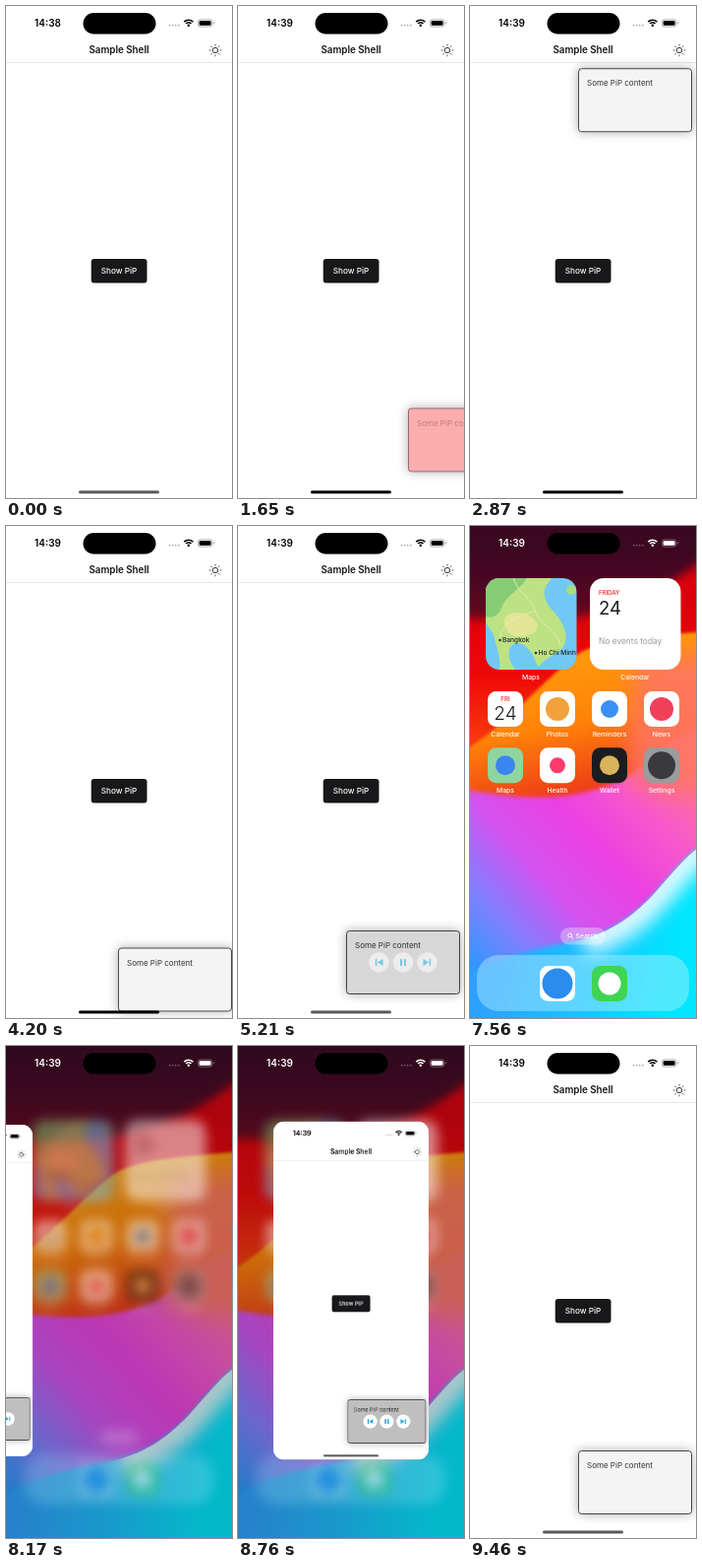
Animation of 230x500 px, one loop 9.66 s. Source, as an HTML page with a canvas:

```html
<!DOCTYPE html>
<html lang="en">
<head>
<meta charset="utf-8">
<title>Picture in picture demo</title>
<style>
html, body { margin: 0; width: 100%; height: 100%; overflow: hidden; background: #fff; }
canvas { display: block; width: 230px; height: 500px; }
</style>
</head>
<body>
<canvas id="stage"></canvas>
<script>
const W = 230, H = 500, LOOP = 9660;
const K = window.devicePixelRatio || 1;

function layer(canvas = document.createElement('canvas')) {
  canvas.width = W * K;
  canvas.height = H * K;
  const c = canvas.getContext('2d');
  c.scale(K, K);
  c.imageSmoothingQuality = 'high';
  return c;
}

const stage = layer(document.getElementById('stage'));
const app = layer(), wall = layer(), icons = layer();

// Eased value at time t from [time, value] keys.
function track(t, ...keys) {
  if (t <= keys[0][0]) return keys[0][1];
  for (let i = 1; i < keys.length; i++) {
    const [t0, a] = keys[i - 1], [t1, b] = keys[i];
    if (t < t1) {
      const u = (t - t0) / (t1 - t0);
      return a + (b - a) * u * u * (3 - 2 * u);
    }
  }
  return keys[keys.length - 1][1];
}

function box(c, x, y, w, h, r, fill) {
  c.beginPath();
  c.roundRect(x, y, w, h, r);
  if (fill) { c.fillStyle = fill; c.fill(); }
}

function disc(c, x, y, r, fill) {
  c.beginPath();
  c.arc(x, y, r, 0, 7);
  c.fillStyle = fill;
  c.fill();
}

function text(c, str, x, y, size, weight, fill, align = 'left') {
  c.font = `${weight} ${size}px Inter, sans-serif`;
  c.textAlign = align;
  c.fillStyle = fill;
  c.fillText(str, x, y);
}

function ramp(c, x0, y0, x1, y1, ...colors) {
  const g = c.createLinearGradient(x0, y0, x1, y1);
  colors.forEach((col, i) => g.addColorStop(i / (colors.length - 1), col));
  return g;
}

function shape(c, path, fill, blur = 0) {
  if (blur) c.filter = `blur(${blur * K}px)`;
  c.fillStyle = fill;
  c.fill(new Path2D(path));
  c.filter = 'none';
}

function statusBar(c, clock, color) {
  text(c, clock, 42.5, 21.2, 10, 600, color, 'center');
  c.save();
  c.globalAlpha *= 0.35;
  for (let i = 0; i < 4; i++) disc(c, 166.5 + 3.1 * i, 19.6, 0.85, color);
  c.restore();
  c.strokeStyle = color;
  c.lineWidth = 1.6;
  for (const r of [3.6, 6.2]) {
    c.beginPath();
    c.arc(185.8, 20.4, r, -Math.PI * 0.76, -Math.PI * 0.24);
    c.stroke();
  }
  disc(c, 185.8, 19.8, 1.2, color);
  c.save();
  c.globalAlpha *= 0.4;
  c.lineWidth = 0.8;
  box(c, 195.4, 13.8, 14.4, 7.2, 2.3);
  c.stroke();
  box(c, 210.7, 16.2, 1, 2.4, 0.5, color);
  c.restore();
  box(c, 196.6, 15, 12, 4.8, 1.4, color);
}

function paintWall(c) {
  c.fillStyle = ramp(c, 0, 460, 230, 250, '#1f9cff', '#7f80ff', '#d452f0', '#ec40e2', '#f858cc', '#ff70a0');
  c.fillRect(0, 0, W, H);

  // Cyan wave with a pale rim
  const crest = 'M240 322C200 345 185 400 115 420';
  const wave = crest + 'C70 428 30 438 -10 458V520H240Z';
  shape(c, wave, ramp(c, 0, 440, 200, 480, '#2f9cff', '#1cbcff', '#00e6ff'), 2);
  c.save();
  c.clip(new Path2D(wave));
  c.filter = `blur(${9 * K}px)`;
  c.strokeStyle = 'rgba(235,252,255,.9)';
  c.lineWidth = 36;
  c.stroke(new Path2D(crest));
  c.restore();

  // Orange, melting into salmon on the right
  shape(c, 'M-10 267C50 278 100 280 145 262C165 254 180 240 195 225L240 200V-10H-10Z',
    ramp(c, 70, 130, 100, 275, '#ff9c0c', '#ff8408', '#ee3a18'), 2);
  shape(c, 'M170 130H270V262C225 282 190 274 158 256Z', 'rgba(255,118,98,.9)', 13);

  shape(c, 'M-20 236C30 212 70 160 110 130C140 112 200 112 250 106V-20H-20Z',
    ramp(c, 0, 80, 0, 220, '#dc000c', '#ee0808', '#f83a0c'), 1.5);
  shape(c, 'M-30 90C40 100 90 98 130 88C170 78 205 62 260 16V-30H-30Z',
    ramp(c, 0, 0, 0, 95, '#36081f', '#460622', '#68081e'), 5);
}

function mapWidget(c) {
  c.save();
  box(c, 16, 53, 92.5, 93, 14, '#72c8f5');
  c.clip();
  shape(c, 'M16 53H84C72 64 74 74 84 86C96 98 102 114 94 124C86 132 76 134 70 143C64 136 66 130 58 124C52 116 42 118 40 126C38 136 44 142 46 146H30C32 132 26 122 24 110L16 98Z', '#bce283');
  shape(c, 'M16 53H58C50 66 36 70 32 84C28 92 22 94 16 92Z', '#86cc74');
  shape(c, 'M36 92C46 84 62 88 68 98C72 108 58 114 46 112C38 110 32 100 36 92Z', '#e2e596');
  disc(c, 103, 65, 5, '#a8dc80');
  c.strokeStyle = '#f0e6a8';
  c.lineWidth = 1;
  c.stroke(new Path2D('M44 53C50 70 62 72 66 86S88 104 92 122M30 114C34 96 50 92 66 86'));
  disc(c, 30.5, 116, 1.3, '#333');
  text(c, 'Bangkok', 33, 118.4, 6.6, 500, '#222');
  disc(c, 67, 129, 1.3, '#333');
  text(c, 'Ho Chi Minh', 69.5, 131.2, 6.6, 500, '#222');
  c.restore();
}

function paintIcons(c) {
  const white = '#fff', red = '#f0383c';
  mapWidget(c);
  box(c, 122, 53, 92.5, 93, 14, white);
  text(c, 'FRIDAY', 131, 70, 6, 600, red);
  text(c, '24', 131, 89.5, 18.5, 400, '#1c1c1e');
  text(c, 'No events today', 131, 119.5, 8.4, 400, '#9a9a9e');
  text(c, 'Maps', 62, 155.5, 6.8, 500, white, 'center');
  text(c, 'Calendar', 168, 155.5, 6.8, 500, white, 'center');

  // label, tile colour, mark colour, mark radius
  const rows = [
    [['Calendar', white], ['Photos', white, '#f2a23c', 12],
     ['Reminders', white, '#3b8ff5', 9], ['News', white, '#f2405c', 12]],
    [['Maps', '#8ed5a0', '#3a86ee', 10], ['Health', white, '#ff3b6b', 8],
     ['Wallet', '#1c1c1e', '#d8b45c', 10], ['Settings', '#9b9ba0', '#3a3a3d', 14]]
  ];
  rows.forEach((row, j) => row.forEach(([name, tile, mark, r], i) => {
    const x = 36 + 53 * i, y = 186 + 57.3 * j;
    box(c, x - 18, y - 18, 36, 36, 8.5, tile);
    if (mark) disc(c, x, y, r, mark);
    text(c, name, x, y + 27.6, 6.8, 500, white, 'center');
  }));
  text(c, 'FRI', 36, 178, 6.2, 600, red, 'center');
  text(c, '24', 36, 197, 19, 300, '#1c1c1e', 'center');

  box(c, 92, 408, 46, 17.5, 8.75, 'rgba(255,255,255,.32)');
  c.strokeStyle = white;
  c.lineWidth = 0.9;
  c.beginPath();
  c.arc(101.7, 416, 2, 0, 7);
  c.moveTo(103.2, 417.5);
  c.lineTo(105, 419.3);
  c.stroke();
  text(c, 'Search', 107.5, 419.2, 6.8, 500, white);

  box(c, 7, 436, 216, 57, 22, 'rgba(190,240,255,.42)');
  box(c, 71, 447, 36, 36, 8.5, white);
  disc(c, 89, 465, 15.5, '#2a8cee');
  box(c, 124, 447, 36, 36, 8.5, '#3fd455');
  disc(c, 142, 465, 11.5, white);
}

function sun(c, x, y) {
  c.strokeStyle = '#222';
  c.lineWidth = 0.9;
  c.beginPath();
  c.arc(x, y, 2.7, 0, 7);
  for (let i = 0; i < 8; i++) {
    const dx = Math.cos(i * Math.PI / 4), dy = Math.sin(i * Math.PI / 4);
    c.moveTo(x + dx * 4.7, y + dy * 4.7);
    c.lineTo(x + dx * 6.2, y + dy * 6.2);
  }
  c.stroke();
}

function controls(c, t) {
  const a = track(t, [5080, 0], [5330, 1], [9120, 1], [9400, 0]);
  if (!a) return;
  const blue = '#1aa7d8';
  c.save();
  c.globalAlpha *= a;
  box(c, 0, 0, 116, 65, 3, 'rgba(0,0,0,.22)');
  for (let i = 0; i < 3; i++) {
    c.save();
    c.translate(33.5 + 24.5 * i, 32.5);
    if (i === 2) c.globalAlpha *= track(t, [5850, 1], [5910, 0.45], [5960, 0.45], [6020, 1]);
    disc(c, 0, 0, 10.3, '#fff');
    if (i === 0) c.scale(-1, 1);
    if (i === 1) {
      box(c, -3, -3.5, 2, 7, 0.5, blue);
      box(c, 1, -3.5, 2, 7, 0.5, blue);
    } else {
      shape(c, 'M-4 -3.5L1.5 0L-4 3.5Z', blue);
      box(c, 2.2, -3.5, 1.5, 7, 0.5, blue);
    }
    c.restore();
  }
  c.restore();
}

function pip(c, t) {
  const first = t < 1900;
  const born = first ? 760 : 2120;
  const show = track(t, [born, 0], [born + 220, 1]);
  if (!show) return;
  const x = first
    ? track(t, [1150, 110], [1650, 173], [1860, 245])
    : track(t, [3700, 110], [4000, 114], [4250, 114], [4680, 110]);
  const y = first
    ? track(t, [1150, 411], [1650, 408.5])
    : track(t, [2450, 411], [2910, 56], [3040, 50], [3220, 56], [3650, 405], [4000, 428.5], [4250, 428.5], [4680, 411]);
  const red = first ? track(t, [1380, 0], [1540, 1]) : 0;
  const s = 0.85 + 0.15 * show;

  c.save();
  c.globalAlpha = show;
  c.translate(x + 58, y + 32.5);
  c.scale(s, s);
  c.translate(-58, -32.5);
  c.save();
  c.shadowColor = 'rgba(0,0,0,.32)';
  c.shadowBlur = 11 * K;
  box(c, 0, 0, 116, 65, 3, '#f4f4f5');
  c.restore();
  text(c, 'Some PiP content', 9, 18.2, 8, 400, '#333');
  if (red) {
    c.save();
    c.globalAlpha *= red;
    box(c, 0, 0, 116, 65, 3, 'rgba(255,148,148,.72)');
    c.restore();
  }
  controls(c, t);
  c.strokeStyle = `rgba(40,40,44,${0.85 - 0.35 * red})`;
  c.lineWidth = 1;
  box(c, 0.5, 0.5, 115, 64, 3);
  c.stroke();
  c.restore();
}

function paintApp(c, t) {
  c.fillStyle = '#fff';
  c.fillRect(0, 0, W, H);
  statusBar(c, t < 100 ? '14:38' : '14:39', '#000');
  text(c, 'Sample Shell', 115, 48.2, 9.8, 600, '#111', 'center');
  sun(c, 213, 45);
  c.fillStyle = '#e6e6e8';
  c.fillRect(0, 57, W, 1);

  c.save();
  c.globalAlpha = track(t, [620, 1], [700, 0.4], [760, 0.4], [900, 1], [1980, 1], [2060, 0.4], [2120, 0.4], [2260, 1]);
  box(c, 86.7, 257, 56.8, 24.5, 3, '#18181b');
  text(c, 'Show PiP', 115, 272.2, 8.2, 500, '#fafafa', 'center');
  c.restore();

  pip(c, t);
  box(c, 74, 492.6, 82, 3, 1.5, t > 900 && t < 4870 ? '#000' : '#585858');
}

function paintHome(c, t) {
  const away = track(t, [6480, 1], [6950, 0], [7680, 0], [8020, 1]);
  c.drawImage(wall.canvas, 0, 0, W, H);
  c.fillStyle = `rgba(20,20,20,${0.22 * away})`;
  c.fillRect(0, 0, W, H);
  const s = 1 - 0.113 * away;
  c.save();
  c.globalAlpha = track(t, [6480, 0.7], [6950, 1], [7680, 1], [8020, 0.5]);
  if (away > 0) c.filter = `blur(${6 * away * K}px)`;
  c.translate(115.5, 250);
  c.scale(s, s);
  c.translate(-115.5, -250);
  c.drawImage(icons.canvas, 0, 0, W, H);
  c.restore();
  c.save();
  c.globalAlpha = track(t, [6430, 0.25], [6700, 1]);
  statusBar(c, '14:39', '#fff');
  c.restore();
}

function card(c, t) {
  const leaving = t < 7400;
  const s = leaving
    ? track(t, [6160, 1], [6440, 0.383], [6700, 0.2])
    : track(t, [8700, 0.674], [9200, 1]);
  const x = leaving
    ? track(t, [6160, 115], [6440, 118], [6700, 115])
    : track(t, [8030, -130], [8400, 115]);
  const y = leaving
    ? track(t, [6160, 250], [6440, 188], [6700, 190])
    : track(t, [8700, 248.5], [9200, 250]);
  // The page fades over a grey plate as the app closes.
  const plate = leaving ? track(t, [6160, 1], [6440, 0.85], [6680, 0]) : 1;
  const page = leaving ? track(t, [6260, 1], [6440, 0.55], [6680, 0]) : 1;
  if (!plate) return;
  const w = W * s, h = H * s, r = Math.min(11, (1 - s) * 80);
  c.save();
  c.globalAlpha = plate;
  box(c, x - w / 2, y - h / 2, w, h, r, '#bbb');
  c.clip();
  c.globalAlpha = page;
  c.drawImage(app.canvas, x - w / 2, y - h / 2, w, h);
  c.restore();
}

function draw(t) {
  paintApp(app, t);
  if (t > 6160 && t < 9200) {
    paintHome(stage, t);
    card(stage, t);
  } else {
    stage.drawImage(app.canvas, 0, 0, W, H);
  }
  box(stage, 78.5, 7, 74, 21.5, 10.75, '#000');
}

paintWall(wall);
paintIcons(icons);

const start = performance.now();
function tick() {
  draw((performance.now() - start) % LOOP);
  requestAnimationFrame(tick);
}
tick();
</script>
</body>
</html>
```
